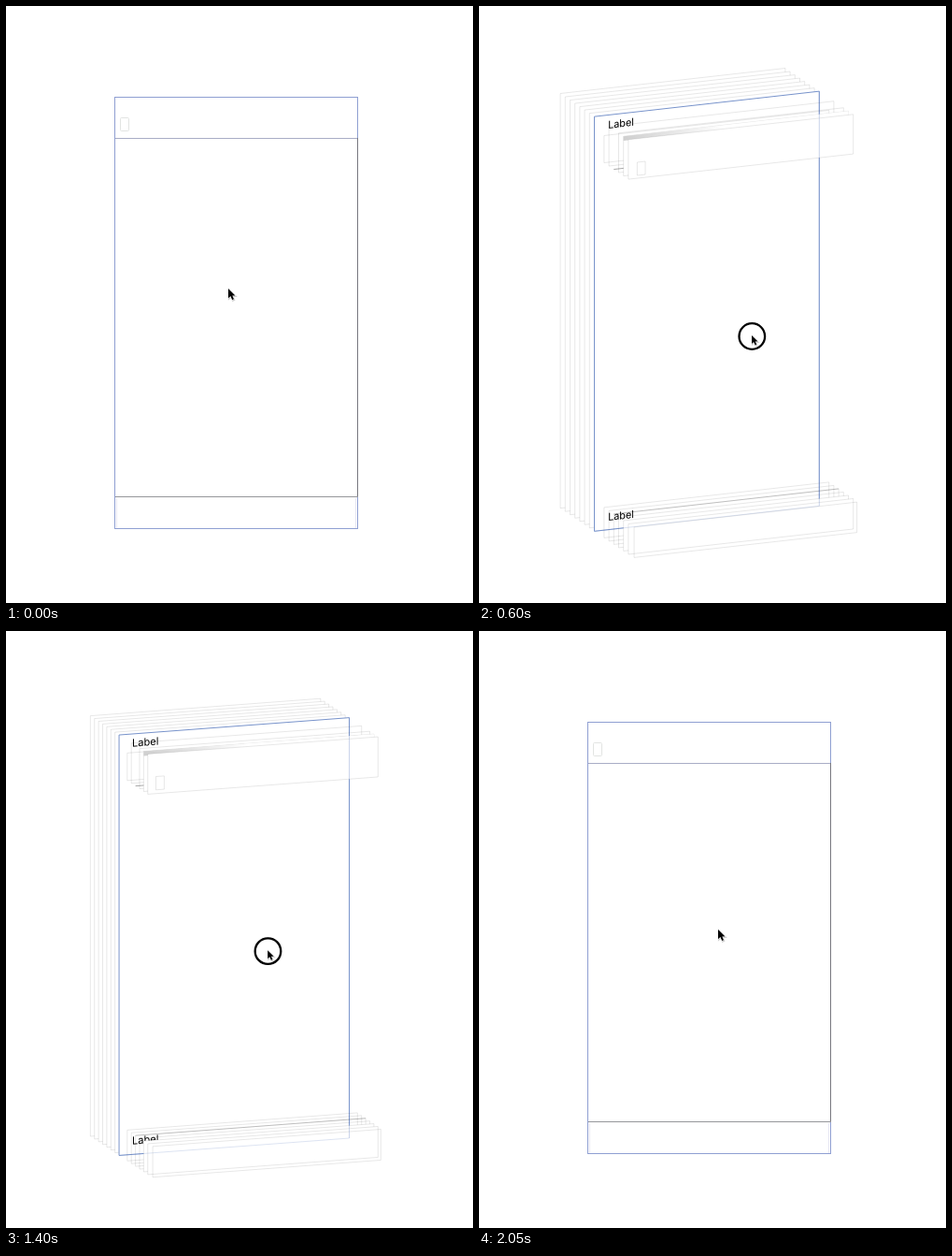
An HTML page that plays this animation: 500x638 px, repeating every 2100 ms.

```html
<!DOCTYPE html>
<html lang="en">
<head>
<meta charset="utf-8">
<title>Layer view</title>
<style>
html, body { margin: 0; width: 100%; height: 100%; overflow: hidden; background: #fff; }
svg { display: block; width: 500px; height: 638px; }
.layer * { vector-effect: non-scaling-stroke; }
text { font: 11.7px Inter, "Liberation Sans", sans-serif; fill: #000; }
</style>
</head>
<body>
<svg viewBox="0 0 500 638">
  <defs>
    <linearGradient id="shade">
      <stop offset="0" stop-color="#cfcfcf"/>
      <stop offset=".45" stop-color="#fff"/>
    </linearGradient>
    <path id="arrow" d="M0 0V10.2L2.4 8 4.2 12 6 11.2 4.3 7.4H7.5Z"/>
  </defs>
  <g id="stack"></g>
  <g id="flat" fill="none">
    <rect x="116.5" y="97.5" width="260" height="461" stroke="#8f9fd2"/>
    <path d="M117 141.5H376" stroke="#a9adc6"/>
    <path d="M376.5 141V525" stroke="#77787f"/>
    <path d="M117 524.5H377" stroke="#96979b"/>
    <path d="M118.5 526V558M374.5 526V558" stroke="#e8e8f2"/>
    <rect x="122.5" y="119.5" width="9" height="14" rx="1" stroke="#e2e4e2"/>
  </g>
  <g id="pointer">
    <circle id="ring" cx=".3" cy="1" r="13.8" fill="none" stroke="#000" stroke-width="2.3"/>
    <g id="cursor">
      <use href="#arrow" x=".6" y="1" opacity=".18" stroke="#000" stroke-width="1.4"/>
      <use href="#arrow" stroke="#fff" paint-order="stroke"/>
    </g>
  </g>
</svg>
<script>
const NS = 'http://www.w3.org/2000/svg';
const LOOP = 2100, TICK = 50;
const W = 260, H = 461, CX = 246.5, CY = 328;
const NAV = 44, STATUS = 13.8, TOOL = 427.2, GAP = 13.8;
const BLUE = '#7893cb', LINE = 'rgba(0,0,0,.095)';
const byId = id => document.getElementById(id);
const stack = byId('stack'), flat = byId('flat');
const pointer = byId('pointer'), ring = byId('ring'), cursor = byId('cursor');
const layers = [];

function add(parent, name, attrs, text) {
  const el = document.createElementNS(NS, name);
  for (const key in attrs) el.setAttribute(key, attrs[key]);
  if (text) el.textContent = text;
  parent.appendChild(el);
}

function layer(level) {
  const g = document.createElementNS(NS, 'g');
  g.setAttribute('class', 'layer');
  stack.appendChild(g);
  layers.push({ g, z: (level - 0.5) * GAP });
  return g;
}

function box(level, x, y, width, height, fill = 'none', stroke = LINE) {
  add(layer(level), 'rect', { x, y, width, height, fill, stroke });
}

function line(level, d, stroke, opacity = 1) {
  add(layer(level), 'path', { d, stroke, opacity, fill: 'none' });
}

// Back planes, then the selected plane with its labels
for (let k = -7; k < 0; k++) box(k, 0, 0, W, H, '#fff');
box(0, 0, 0, W, H, '#fff', BLUE);
for (const y of [10.7, 446.7]) add(layer(1), 'text', { x: 10.2, y }, 'Label');

// Bars in front
for (let k = 2; k < 8; k++) {
  const fill = k > 5 ? '#fff' : 'none';
  const top = k === 2 ? STATUS : 0;
  if (k === 4) {
    line(k, `M0 ${NAV}H${W}`, 'rgba(0,0,0,.34)');
    line(k, `M0 ${TOOL}H${W}`, 'rgba(0,0,0,.18)');
  } else {
    box(k, 0, top, W, NAV - top, fill);
  }
  if (k === 6) box(k, 0, 0, W, 5, 'url(#shade)', 'none');
  box(k, 0, TOOL, W, H - TOOL, fill);
}
box(8, 4.6, 22, 9.4, 14.6);
box(8, 1, TOOL, W - 2.4, H - TOOL);

// The selection shows through the bars
line(0, `M${W} 0V${H}`, BLUE, 0.4);
line(0, `M0 ${H}H${W}`, BLUE, 0.25);

function ease(t, from, to) {
  const u = Math.min(1, Math.max(0, (t - from) / (to - from)));
  return u * u * (3 - 2 * u);
}

// Falls from 1 to 0 around mid with a long soft tail
const release = (t, mid, width) => 1 / (1 + Math.exp((t - mid) / width));

function draw(t) {
  const yawDeg = 22.7 * ease(t, 110, 650) * release(t, 1512, 75);
  const pitchDeg = 17.1 * ease(t, 110, 690) * release(t, 1475, 67);
  const yaw = yawDeg * Math.PI / 180, pitch = pitchDeg * Math.PI / 180;
  const back = 1 - release(t, 1450, 70);
  const x = 238 + 54 * ease(t, 50, 600) - 36 * back;
  const y = 302 + 50 * ease(t, 0, 560) - 33 * back;

  const isFlat = yawDeg < 0.02;
  flat.style.display = isFlat ? '' : 'none';
  stack.style.display = isFlat ? 'none' : '';
  const sy = Math.sin(yaw), cy = Math.cos(yaw);
  const sp = Math.sin(pitch), cp = Math.cos(pitch);
  for (const { g, z } of layers) {
    const ox = CX - W / 2 * cy + z * sy;
    const oy = CY - H / 2 * cp + W / 2 * sy * sp + z * cy * sp;
    g.setAttribute('transform', `matrix(${cy} ${-sy * sp} 0 ${cp} ${ox} ${oy})`);
  }

  const pressed = t >= 150 && t < 1650;
  pointer.setAttribute('transform', `translate(${x} ${y})`);
  cursor.setAttribute('transform', `scale(${pressed ? 0.88 : 1})`);
  ring.style.display = pressed ? '' : 'none';
}

const start = performance.now();
function loop() {
  const t = (performance.now() - start) % LOOP;
  draw(Math.floor(t / TICK) * TICK);
  requestAnimationFrame(loop);
}
loop();
</script>
</body>
</html>
```
